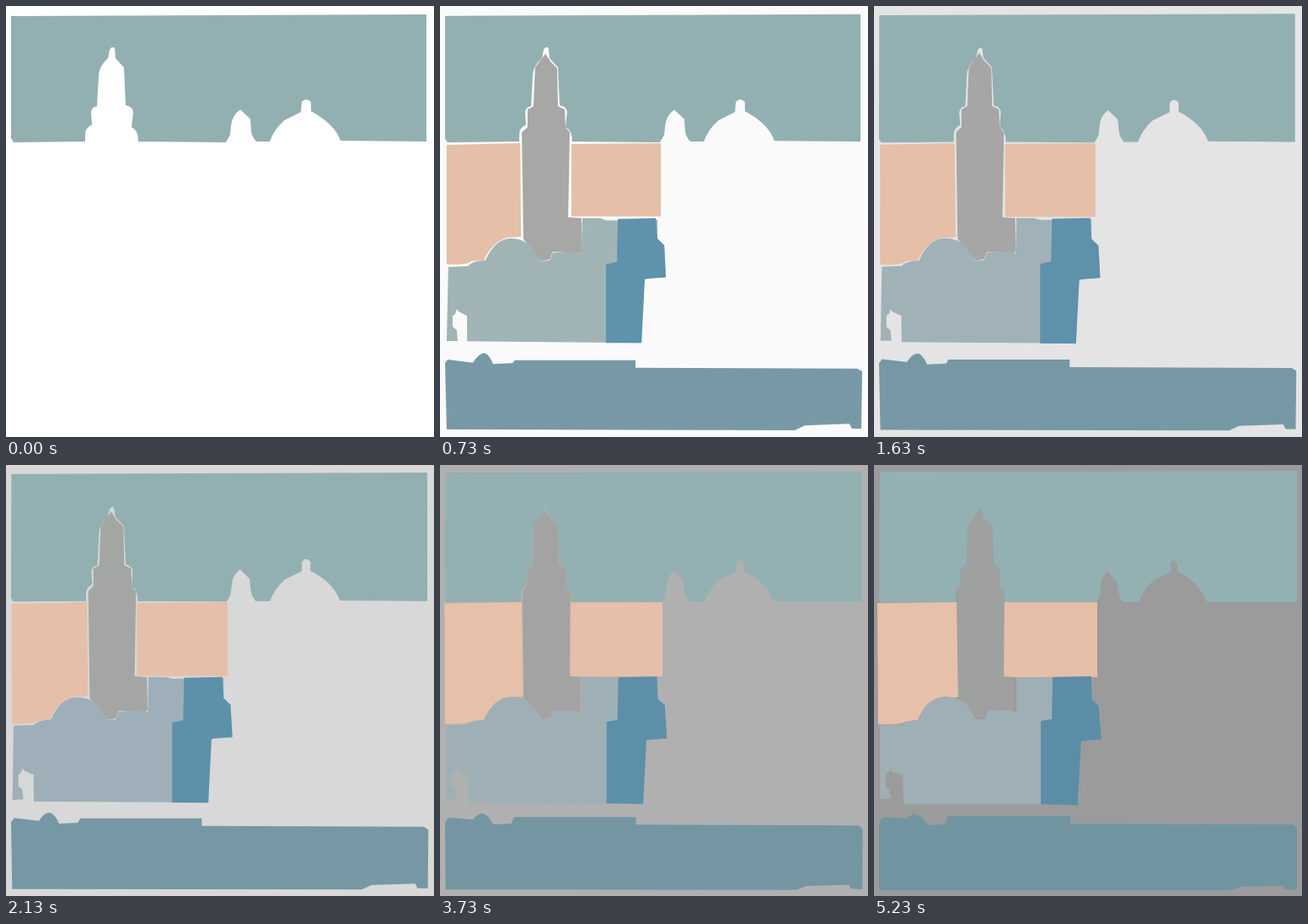
An HTML page with a canvas for the animation above (5330 ms loop, 508 px wide and 512 px high).

```html
<!DOCTYPE html>
<html>
<head>
<meta charset="utf-8">
<style>
html, body { margin: 0; width: 100%; height: 100%; overflow: hidden; }
canvas { display: block; }
</style>
</head>
<body>
<canvas width="508" height="512"></canvas>
<script>
const ctx = document.querySelector('canvas').getContext('2d');
const LOOP = 5330, MORPH_START = 530, MORPH_END = 5230, FADE_END = 4600;

const clamp = v => Math.min(1, Math.max(0, v));

// Interpolates every number of two strings that share one structure.
function mix(a, b, p) {
  const ends = b.match(/\d+/g);
  let i = 0;
  return a.replace(/\d+/g, n => (+n + (ends[i++] - n) * p).toFixed(2));
}

// The big building shifts between bluish and greenish tones.
const buildingTones = [
  [530, 'rgb(160,180,182)'], [1230, 'rgb(161,181,181)'], [2130, 'rgb(159,175,185)'],
  [2930, 'rgb(155,180,181)'], [3730, 'rgb(159,175,182)'], [5230, 'rgb(158,175,181)']
];
function buildingColor(t) {
  if (t < MORPH_START) return 'rgb(143,171,182)';
  const next = Math.max(1, buildingTones.findIndex(tone => tone[0] >= t));
  const [t0, c0] = buildingTones[next - 1], [t1, c1] = buildingTones[next];
  return mix(c0, c1, clamp((t - t0) / (t1 - t0)));
}

const parts = [
  { // sky with the skyline cut out
    at: 0, color: ['rgb(146,176,178)', 'rgb(147,176,178)'],
    from: `M6 12 L499 10 L499 161 L397 160 Q390 140 362 125 L362 114 Q356 108 351 114 L350 126
      L330 136 Q318 147 313 161 L297 161 Q291 154 291 148 L290 134 L278 123 Q268 130 267 143
      L266 153 L261 162 L157 161 Q157 147 149 144 L151 126 Q150 119 142 118 L140 73 L130 62
      L129 50 Q125 47 123 52 L121 62 Q110 72 110 83 L108 119 Q101 120 101 127 L102 141
      Q94 145 94 152 L94 161 L9 162 L6 157 Z`,
    to: `M7 8 L502 7 L502 163 L395 163 Q386 138 360 127 L360 117 Q356 110 352 117 L353 127
      L333 136 Q320 147 314 163 L295 163 Q291 157 290 150 L287 137 L277 126 Q268 135 269 147
      L268 155 L264 163 L155 163 Q155 149 150 145 L149 125 Q149 121 142 119 L140 72 L130 62
      L126 52 Q125 51 124 53 L120 62 Q111 71 111 79 L110 119 Q102 122 102 127 L103 143
      Q97 147 97 152 L97 163 L7 163 L6 160 Z`
  },
  { // left wall
    at: 100, color: ['rgb(229,191,168)', 'rgb(231,192,169)'],
    from: 'M8 165 L95 163 L96 274 L80 275 Q62 280 52 302 L37 303 Q34 308 8 307 Z',
    to: 'M4 164 L98 163 L100 276 L85 276 Q62 280 52 303 L37 305 Q32 309 5 308 Z'
  },
  { // right wall
    at: 500, color: ['rgb(229,191,168)', 'rgb(230,191,168)'],
    from: 'M156 164 L262 163 L262 250 L156 250 Z',
    to: 'M154 163 L265 163 L265 252 L154 252 Z'
  },
  { // tower
    at: 200, color: ['rgb(167,168,166)', 'rgb(159,161,160)'],
    from: `M125 57 L131 66 L139 74 L140 119 L148 123 L149 144 L154 150 L152 251 L168 252
      L169 291 L167 294 L134 292 L130 301 L120 303 L99 277 L97 150 L104 144 L104 123
      L111 119 L113 73 Z`,
    to: `M125 52 L130 62 L140 72 L141 119 L149 122 L150 145 L155 150 L154 251 L166 252
      L166 291 L165 292 L134 292 L131 300 L123 302 L100 276 L99 150 L103 143 L103 123
      L110 119 L111 72 Z`
  },
  { // domed building
    at: 300, color: buildingColor,
    from: `M10 310 L33 309 Q37 303 54 302 Q66 276 84 276 Q100 276 110 288 L120 303 L130 302
      L134 293 L160 292 L168 294 L169 252 L190 252 L198 255 L258 254 L258 276 Q261 282 266 284
      L268 322 L246 323 L240 327 L239 400 L32 398 L32 368 L22 363 L20 360 L18 366 L15 368
      L15 381 L20 385 L21 398 L8 398 Z`,
    to: `M7 309 L33 308 Q38 304 52 303 Q62 276 85 275 Q100 275 110 285 L121 302 L131 302
      L135 292 L160 291 L169 294 L169 252 L190 252 L198 252 L259 251 L259 278 Q262 284 268 285
      L270 326 L248 327 L246 330 L243 403 L35 403 L34 368 L21 364 L19 360 L18 364 L14 367
      L14 382 L18 386 L20 396 L7 397 Z`
  },
  { // blue block
    at: 530, color: ['rgb(94,146,173)', 'rgb(92,141,167)'],
    from: `M211 253 L256 252 L258 276 L266 284 L268 322 L243 324 L239 400 L197 400 L197 307
      L210 304 Z`,
    to: `M212 252 L258 251 L259 279 L267 286 L270 326 L246 328 L242 404 L198 403 L198 304
      L211 302 Z`
  },
  { // lower strip
    at: 400, color: ['rgb(119,153,166)', 'rgb(113,149,160)'],
    from: `M6 424 L9 420 L39 424 Q46 412 53 412 Q58 413 63 425 L86 424 L89 421 L232 421
      L232 430 L495 431 L501 434 L500 502 L489 502 L486 496 L433 498 L421 504 L8 503 Z`,
    to: `M6 425 L11 418 L39 420 Q44 415 48 415 Q57 415 63 428 L84 427 L87 417 L233 417
      L233 426 L498 427 L502 432 L502 505 L487 504 L485 500 L436 501 L424 505 L6 505 Z`
  }
];

function draw(now) {
  const raw = now % LOOP;
  const t = raw < MORPH_START ? raw : Math.floor((raw - 30) / 100) * 100 + 30;
  const p = clamp((t - MORPH_START) / (MORPH_END - MORPH_START));
  const fade = clamp((t - MORPH_START) / (FADE_END - MORPH_START));

  ctx.fillStyle = mix('rgb(255,255,255)', 'rgb(155,155,155)', fade);
  ctx.fillRect(0, 0, 508, 512);
  for (const { at, color, from, to } of parts) {
    if (t < at) continue;
    ctx.fillStyle = typeof color === 'function' ? color(t) : mix(...color, p);
    ctx.fill(new Path2D(mix(from, to, p)));
  }
}

function tick() {
  draw(performance.now());
  requestAnimationFrame(tick);
}
tick();
</script>
</body>
</html>
```
